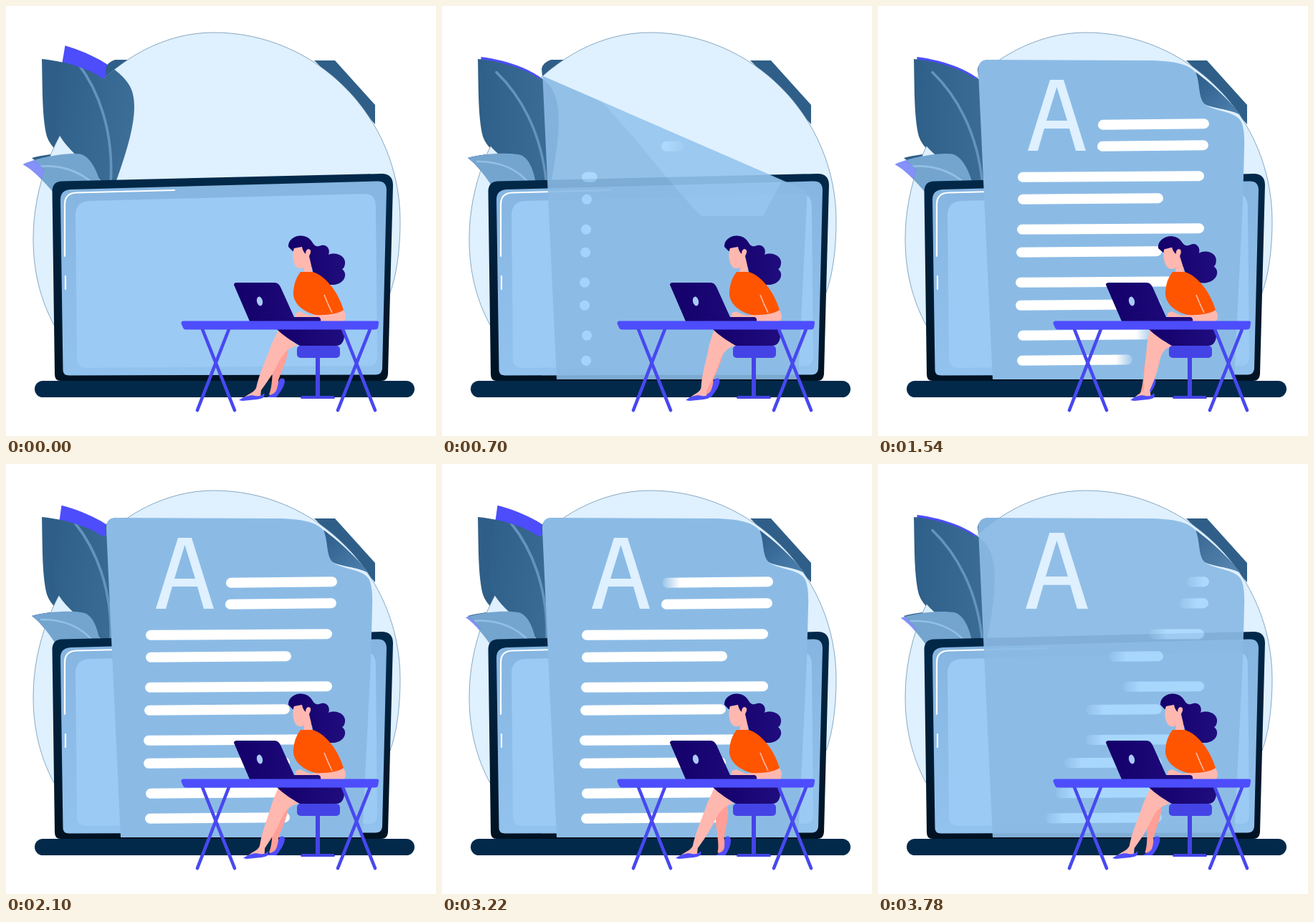
Write an HTML page that moves like this. It is 600 by 600 pixels and loops after 3.92 s.

```html
<!DOCTYPE html>
<html lang="en">
<head>
<meta charset="utf-8">
<title>Writing at a desk</title>
<style>
  html, body { margin: 0; width: 100%; height: 100%; overflow: hidden; background: #fff; }
  svg { display: block; width: 100vw; height: 100vh; }
  .violet { fill: #4d4dfc; }
  .seat { fill: #4444e6; }
  .lilac { fill: #8391f8; }
  .skin { fill: #ffb8b0; }
  .dusk { fill: #2f5f88; }
  .rail { fill: none; stroke: #4848f0; stroke-width: 4.6; stroke-linecap: round; }
  .shine { fill: none; stroke: #fff; stroke-width: 2.2; stroke-linecap: round; }
</style>
</head>
<body>
<svg viewBox="0 0 600 600">
  <defs>
    <path id="disc" d="M290 37C433 37 550 155 550 300C550 340 545 375 536 400L300 500L67 445C48 410 38 370 38 325C38 177 154 37 290 37Z"/>
    <path id="big" d="M50 74C90 78 130 92 147 112C166 135 163 185 150 258L142 258C120 228 68 214 57 182C50 155 51 110 50 74Z"/>
    <path id="small" d="M36 212C60 205 95 204 110 208C122 213 128 230 131 248L72 255C62 240 50 222 36 212Z"/>
    <clipPath id="leafArea"><use href="#disc"/><use href="#big"/><use href="#small"/></clipPath>
    <clipPath id="reveal"><polygon id="edge"/></clipPath>
    <linearGradient id="leafFill" x1="0" x2="1"><stop stop-color="#2f6089"/><stop offset="1" stop-color="#3d6e97"/></linearGradient>
    <linearGradient id="ink" x1="0" x2="1"><stop stop-color="#14006a"/><stop offset="1" stop-color="#200d7e"/></linearGradient>
    <linearGradient id="glass" x1="0" x2="0" y1="0" y2="1"><stop stop-color="#85b5e0"/><stop offset="1" stop-color="#92c2ee"/></linearGradient>
    <linearGradient id="frame" x1="0" x2="0" y1="0" y2="1"><stop stop-color="#02294a"/><stop offset="1" stop-color="#001222"/></linearGradient>
    <linearGradient id="foldFill" x1="0" x2="1" y1="0" y2="1"><stop stop-color="#2c5c88"/><stop offset="1" stop-color="#4f82b0"/></linearGradient>
  </defs>

  <!-- backdrop and leaves -->
  <use href="#big" class="bigPose violet"/>
  <use href="#small" class="smallPose lilac"/>
  <g class="dusk">
    <path d="M430 76H459L515 138V165L470 115ZM140 98L139 88Q140 79 152 75H172L150 100Z"/>
    <use href="#big"/>
    <use href="#small"/>
  </g>
  <use href="#disc" fill="#dff0fe" stroke="#5b86a6" stroke-width=".7"/>
  <g clip-path="url(#leafArea)">
    <g class="bigPose">
      <use href="#big" fill="url(#leafFill)"/>
      <path d="M72 95C105 125 137 175 146 250" fill="none" stroke="#6493bc" stroke-width="3.6" stroke-linecap="round"/>
    </g>
    <g class="smallPose">
      <use href="#small" fill="#74a5cf"/>
      <path d="M48 217C80 216 106 228 122 248" fill="none" stroke="#93bfe4" stroke-width="2.5"/>
    </g>
  </g>

  <!-- big screen -->
  <rect fill="#02294a" x="40" y="523" width="530" height="23" rx="11.5"/>
  <path fill="url(#frame)" d="M64.500 258Q65 245 78 244.500L524 234Q540 234 540 250L533 514Q532 523 524 523H76Q68 523 68 514Z"/>
  <path fill="url(#glass)" d="M76 270Q76 257 90 256L518 244.500Q531 244 531 257L525 506Q524 514.500 516 514.500L88 515.500Q79.500 515.500 79.500 508Z"/>
  <path fill="#9bcaf4" d="M97 292Q97 273 116 272L500 262Q516 262 516 280L518 490Q518 502 506 502L112 505Q99 505 99 492Z"/>
  <path class="shine" d="M235 257L98 260.500Q82 261 82 277V349M83 377V395"/>

  <!-- page -->
  <g id="page" clip-path="url(#reveal)">
    <path fill="#8bbbe5" d="M140 91Q139 75 153 75L375 76C415 76 436 82 444 94C450 108 446 128 456 137C470 148 502 146 508 164Q512 176 511 200L509 275L497 521H160L147 243Z"/>
    <path fill="url(#foldFill)" d="M443 92C450 108 446 128 456 137C466 143 488 143 506 152C494 136 470 112 443 92Z"/>
    <path id="sheen" fill="#9fd0fa" d="M140 97L190 105C240 140 300 230 362 293H448L475 243Z"/>
    <path id="letter" fill="#dff0ff" fill-rule="evenodd" d="M209 202L240 103H259L290 202H276L267 171H232L223 202ZM235 160H264L249.500 113Z"/>
    <g id="lines" stroke-width="14" stroke-linecap="round"></g>
  </g>

  <!-- woman -->
  <g id="backLeg">
    <path fill="#ff9f98" d="M378 463L394 468C396 488 386 505 380 522C381 533 378 541 371 544L367 542C372 530 371 515 373 500Z"/>
    <path class="violet" d="M364 546C370 541 376 542 378 534C380 528 380 522 383 520Q389 518 389 524C388 532 382 540 377 546Z"/>
  </g>
  <g id="frontLeg">
    <path class="skin" d="M380 452L407 474C393 477 388 484 382 494C374 511 365 524 356 536L355 545L330 548C337 541 346 540 349 533C354 510 364 492 370 473Z"/>
    <path class="violet" d="M325 550C333 544 343 542 348 544C354 545 358 543 360 540C362 546 358 548 350 549L330 551Z"/>
  </g>
  <path fill="url(#ink)" d="M377 450H471C474 462 471 474 461 474H410C398 467 388 461 377 450Z"/>
  <rect class="seat" x="406" y="474" width="60" height="17" rx="5"/>
  <path class="seat" d="M432 490H438V544H457Q461 548 457 548H413Q409 548 413 544H432Z"/>
  <g id="head">
    <path fill="url(#ink)" d="M394 336C393 320 418 314 427 329C432 338 436 335 440 334C448 332 453 340 450 347C462 342 475 350 473 360Q472 366 469 367C478 374 472 388 457 389C442 390 429 381 427 365L412 345L400 342Z"/>
    <path class="skin" d="M402 338C398 349 402 365 409 366Q414 367 416 364L415 374H427L426 362L423 349Q428 340 422 339Q418 340 418 346Q414 342 413 336Z"/>
  </g>
  <path class="skin" d="M468 422C476 428 475 438 471 440H402Q401 435 404 432V429Q410 424 414 428L424 432L455 429Z"/>
  <path fill="#ff5500" d="M411 371H428C446 376 464 400 471 424C465 429 448 432 432 431C412 426 400 413 401 399Q402 382 411 371Z"/>
  <path d="M444 403Q449 416 455 428" fill="none" stroke="#ffc0b0" stroke-width="1.5"/>

  <!-- desk -->
  <path fill="url(#ink)" d="M318 389Q318 386 322 386H375Q380 386 383 392L402 434H436Q440 435 439 440H340Z"/>
  <ellipse cx="354" cy="412" rx="4" ry="6.500" fill="#a9cbf8" transform="rotate(-12 354 412)"/>
  <path class="rail" d="M274 451L319 564M311 451L267 564M470 451L515 564M508 451L463 564"/>
  <path class="violet" d="M247 439.500H518Q521 440 520 443L519 449Q518 451.500 515 451.500H251Q248 451.500 247 449L244.500 443Q244 440 247 439.500Z"/>
</svg>
<script>
  const STEP = 140, COUNT = 28, NS = "http://www.w3.org/2000/svg";
  const $ = id => document.getElementById(id);
  const defs = document.querySelector("defs");
  const clamp = v => Math.min(1, Math.max(0, v));
  const smooth = v => (v = clamp(v), v * v * (3 - 2 * v));

  // keys: flat list of step, value pairs
  function track(keys, k) {
    let i = 0;
    while (i + 2 < keys.length && keys[i + 2] <= k) i += 2;
    if (i + 2 >= keys.length || k < keys[0]) return keys[i + 1];
    const u = (k - keys[i]) / (keys[i + 2] - keys[i]);
    return keys[i + 1] + (keys[i + 3] - keys[i + 1]) * u;
  }

  function set(el, attrs) {
    for (const name in attrs) el.setAttribute(name, attrs[name]);
    return el;
  }
  const make = (tag, parent, attrs) =>
    set(parent.appendChild(document.createElementNS(NS, tag)), attrs);
  const pose = (name, transform) =>
    document.querySelectorAll("." + name).forEach(el => set(el, { transform }));

  // left, right, middle height of each text line
  const lines = [
    [307, 462, 165], [306, 461, 195], [195, 455, 238], [195, 398, 269], [194, 455, 311],
    [193, 396, 343], [192, 430, 385], [192, 396, 417], [195, 396, 459], [194, 396, 494]
  ].map(([x1, x2, y], i) => {
    const grad = make("linearGradient", defs,
      { id: "soft" + i, gradientUnits: "userSpaceOnUse", y1: 0, y2: 0 });
    make("stop", grad, { offset: 0, "stop-color": "currentColor" });
    make("stop", grad, { offset: 1, "stop-color": "currentColor", "stop-opacity": .1 });
    const el = make("line", $("lines"), { stroke: `url(#soft${i})` });
    return { x1: x1 + 7, x2: x2 - 7, y, grad, el };
  });

  function drawLine({ x1, x2, y, grad, el }, i, k) {
    const grow = smooth((k - 3.7 - .42 * i - .009 * i * i) / 4);
    const wipe = smooth((k - 22.8 - .29 * i) / 5.4);
    const a = x1 + (x2 - x1) * wipe;
    const b = Math.max(x1 + .1, x1 + (x2 - x1) * grow);
    const slope = x => y + .8 - 1.6 * (x - x1) / (x2 - x1);
    set(el, { x1: a, x2: b, y1: slope(a), y2: slope(b) });
    if (wipe > 0) set(grad, { x1: a + 18, x2: a - 8 });
    else if (grow > .04 && grow < 1) set(grad, { x1: b - 16, x2: b + 9 });
    else set(grad, { x1: x2 + 60, x2: x2 + 90 });
  }

  // slide a foot along the floor while the knee stays
  function lean(id, shift) {
    const s = shift / 94;
    set($(id), { transform: `matrix(1 0 ${s} 1 ${-455 * s} 0)` });
  }

  function draw(k) {
    const sway = (1 + Math.cos(k * Math.PI / 4)) / 2;
    pose("bigPose", `translate(148 250) rotate(${10.5 * sway}) scale(${1 + .02 * sway}) translate(-148 -250)`);
    const dip = track([0, 1, 5, 0, 7, 0, 11, 1, 15, 0, 19, 1, 23, .25, 27, .33], k);
    pose("smallPose", `translate(125 245) rotate(${-7 * dip}) scale(${1 + .1 * dip}) translate(-125 -245)`);

    lean("frontLeg", track([0, 0, 2, 2, 5, 15, 7, 33, 9, 34, 11, 27, 15, 6, 19, 0, 27, 2], k));
    lean("backLeg", track([0, 0, 5, -2, 7, -3, 11, -2, 15, 0, 19, 10, 23, 19, 27, 6], k));
    const nod = track([8, 0, 10, 1, 12, 1, 14, 0], k);
    set($("head"), { transform: `rotate(${-4.5 * nod} 421 373)` });

    const left = track([0, 243, 5, 93, 6, 70], k);
    const right = track([0, 300, 5, 267, 7, 60], k);
    set($("edge"), { points: `130,${left} 530,${right} 530,530 130,530` });
    set($("page"), { opacity: track([0, 0, 1, .2, 5, .9, 7, 1, 26, 1, 27, .93], k) });
    set($("sheen"), { opacity: track([0, 0, 5, .5, 7, 0], k) });

    const size = track([5, 1.12, 7, 1.07, 9, 1, 24, 1, 27, 1.07], k);
    set($("letter"), {
      opacity: track([5, 0, 6, .6, 7, 1], k),
      transform: `translate(249.5 202) scale(${size}) translate(-249.5 -202)`
    });

    const white = track([5, .05, 7, .55, 9, 1, 24, 1, 27, .05], k);
    defs.style.color = `rgb(${165 + 90 * white}, ${214 + 41 * white}, 255)`;
    set($("lines"), { opacity: track([3, 0, 5, .9, 7, 1], k) });
    lines.forEach((line, i) => drawLine(line, i, k));
  }

  const start = performance.now();
  function tick() {
    draw(Math.floor((performance.now() - start) / STEP) % COUNT);
    requestAnimationFrame(tick);
  }
  tick();
</script>
</body>
</html>
```
